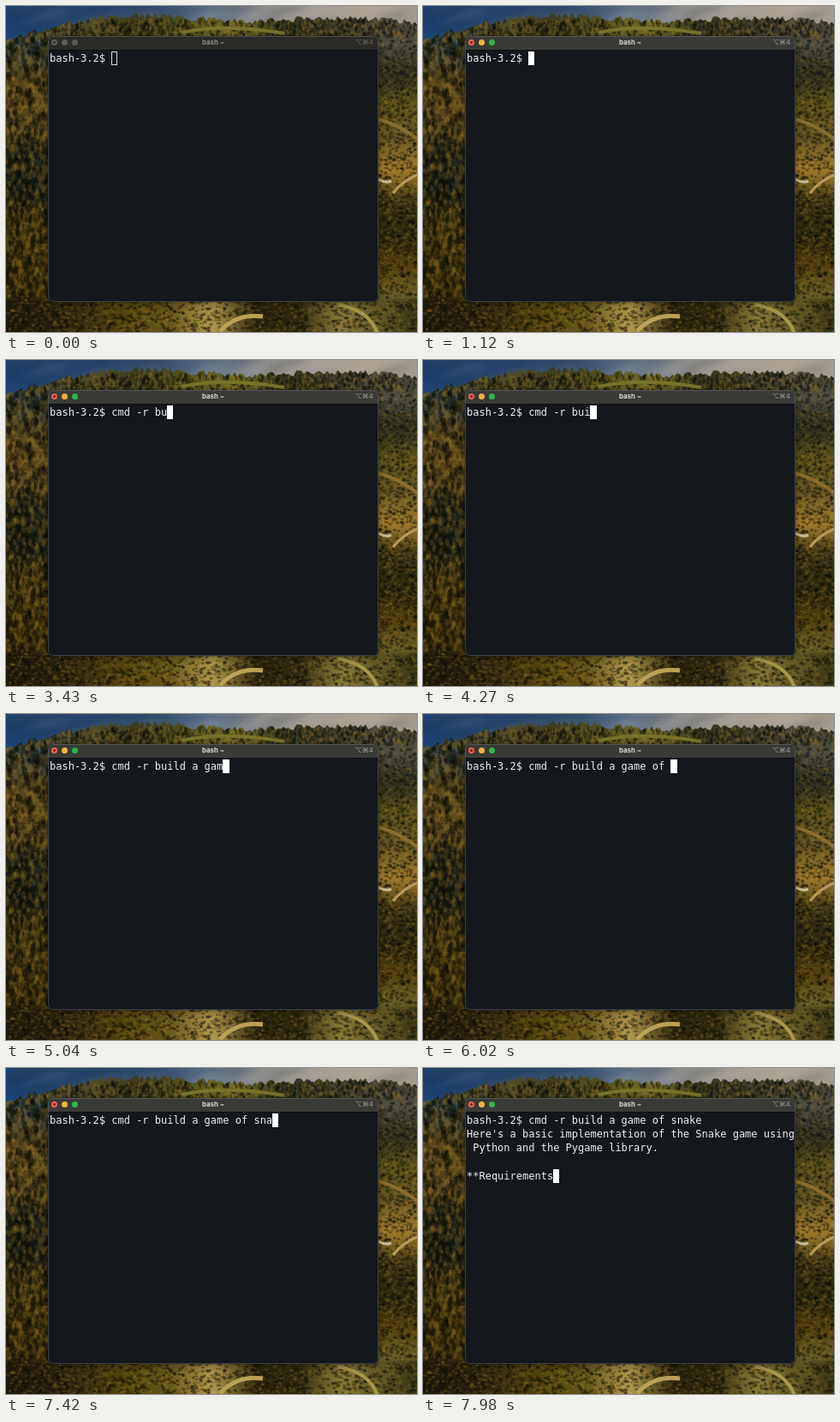
An HTML page with a canvas for the animation above (8 s loop, 480x380 px).

```html
<!DOCTYPE html>
<html lang="en">
<head>
<meta charset="utf-8">
<title>Terminal</title>
<style>
  html, body { margin: 0; width: 100%; height: 100%; overflow: hidden; background: #252812; }
  #stage { position: relative; width: 480px; height: 380px; overflow: hidden; }
  #land { position: absolute; left: 0; top: 0; }
  #win {
    position: absolute; left: 49px; top: 35px; width: 386px; height: 310px;
    border-radius: 6px; background: #14181c; overflow: hidden;
    box-shadow: 0 0 1px #000, 0 2px 8px rgba(0, 0, 0, .4);
  }
  #win::after {
    content: ""; position: absolute; inset: 0; border-radius: 6px;
    border: 1px solid rgba(120, 128, 132, .4);
  }
  #bar {
    position: absolute; left: 0; top: 0; width: 100%; height: 17px; box-sizing: border-box;
    background: #2b2a26; border-bottom: 1px solid #0c0f11; color: #8c8a86;
    font: 700 7.8px/15px Inter, "Liberation Sans", sans-serif; text-align: center;
  }
  #key {
    position: absolute; right: 6px; top: 0; color: #686763;
    font: 8px/15px Inter, "DejaVu Sans", sans-serif;
  }
  #dots { position: absolute; left: 4px; top: 4px; display: flex; gap: 5px; }
  #dots i { width: 7px; height: 7px; border-radius: 50%; background: #5c5b57; }
  #dots i:first-child { background: radial-gradient(circle, #33322f 1px, #5c5b57 1.6px); }
  .on #bar { background: #3a3a37; color: #dddbd7; }
  .on #key { color: #9b9995; }
  .on #dots i { background: #2bb845; }
  .on #dots i:nth-child(2) { background: #f3b13c; }
  .on #dots i:first-child { background: radial-gradient(circle, #74140f 1px, #ee5f55 1.6px); }
  #text, #cursor { position: absolute; font: 12px/16.2px "DejaVu Sans Mono", monospace; }
  #text { left: 2px; top: 18px; margin: 0; color: #eeefef; white-space: pre; }
  #cursor { width: 1ch; height: 16.2px; box-sizing: border-box; border: 1px solid #d8dadb; }
  .on #cursor { background: #fff; border-color: #fff; }
</style>
</head>
<body>
<div id="stage">
  <canvas id="land" width="480" height="380"></canvas>
  <div id="win">
    <div id="bar"><span id="dots"><i></i><i></i><i></i></span>bash ~<span id="key">⌥⌘4</span></div>
    <pre id="text"></pre>
    <div id="cursor"></div>
  </div>
</div>
<script>
const $ = id => document.getElementById(id);

// Landscape: soft colour bands around the window, roughened with random foliage
const ctx = $('land').getContext('2d');
let seed = 11;
const rnd = () => (seed = (seed * 16807) % 2147483647) / 2147483647;

function band(x, y, w, h, colors) {
  const g = w > h ? ctx.createLinearGradient(x, 0, x + w, 0) : ctx.createLinearGradient(0, y, 0, y + h);
  const list = colors.split(' ');
  list.forEach((c, i) => g.addColorStop(i / (list.length - 1), '#' + c));
  ctx.fillStyle = g;
  ctx.fillRect(x, y, w, h);
}

function foliage(x, y, w, h, size, tall) {
  const count = w * h / size / 2;
  for (let i = 0; i < count; i++) {
    const s = size * (.4 + rnd() * .6);
    ctx.fillStyle = rnd() < .6 ? 'rgba(10,13,6,.38)' : 'rgba(165,125,38,.22)';
    ctx.beginPath();
    ctx.ellipse(x + rnd() * w, y + rnd() * h, s / 2, s * tall / 2, 0, 0, 7);
    ctx.fill();
  }
}

function path(color, width, x, y, cx, cy, x2, y2) {
  ctx.strokeStyle = color;
  ctx.lineWidth = width;
  ctx.beginPath();
  ctx.moveTo(x, y);
  ctx.quadraticCurveTo(cx, cy, x2, y2);
  ctx.stroke();
}

const ridge = x => 17 + 22 * Math.exp(-x / 60) + 4 * Math.sin(x / 45 + 1.5) + 8 * Math.max(0, x - 330) / 150;

function paintLand() {
  ctx.filter = 'blur(2px)';
  band(-9, 0, 70, 380, '27496f 2f4149 51441c 665122 2b2d1a 18211a 443a12 4d3e0f 40340e 1e1a0c');
  band(420, 0, 70, 380, '9b9287 55534a 2b2d20 57501b 645425 a27b2b 3c3515 2b290e 56400f 66602a 2b2a0d');
  band(-9, 341, 500, 50, '1d190b 241e0c 3d3211 54440f 66551b b39a4d 30290e 2c280d 87793a 5b5423 2e2c10');
  band(-9, 8, 500, 32, '394133 3d4130 514b24 3d3c1e 545320 6b6826 363820 3d3d2a 4c493c 45443b');
  ctx.filter = 'none';

  foliage(0, 36, 50, 306, 6, 1.8);
  foliage(435, 40, 45, 300, 5, .8);
  foliage(0, 342, 480, 38, 5, .8);
  foliage(0, 16, 480, 20, 4, 1.6);

  // Sky and fog down to a tree-lined ridge
  ctx.save();
  ctx.filter = 'blur(1px)';
  ctx.beginPath();
  ctx.moveTo(490, -9);
  ctx.lineTo(-9, -9);
  for (let x = -9; x < 490; x += 3) ctx.lineTo(x, ridge(x) - rnd() * 7);
  ctx.clip();
  band(-9, -9, 500, 60, '1c4578 25466f 27456c 344d6c 5c6e84 918f8b a49c92 aea497 a0978b');
  ctx.filter = 'blur(4px)';
  for (let i = 0; i < 45; i++) {
    ctx.fillStyle = rnd() < .5 ? 'rgba(12,28,48,.2)' : 'rgba(190,188,184,.12)';
    ctx.beginPath();
    ctx.ellipse(rnd() * 480, rnd() * 36, 28, 4, -.25, 0, 7);
    ctx.fill();
  }
  ctx.restore();

  // Clearings and tracks
  ctx.filter = 'blur(.7px)';
  path('#77732b', 4, 205, 31, 255, 20, 325, 32);
  path('#8a6c2f', 4, 435, 132, 458, 138, 482, 156);
  path('#b9985a', 3, 452, 218, 464, 203, 482, 196);
  path('#c5ba9b', 3, 435, 202, 443, 207, 450, 204);
  path('#bba158', 5, 250, 379, 270, 358, 300, 362);
  path('#a8964c', 4, 388, 348, 425, 355, 434, 382);
  ctx.filter = 'none';
}

// Terminal
const LOOP = 8000, FOCUS = 560, ENTER = 7770, REPLY = 7910, MORE = 7980;
const prompt = 'bash-3.2$ ';
const reply = "\nHere's a basic implementation of the Snake game using\n Python and the Pygame library.";
const more = '\n\n**Requirements';

// Typing bursts: text, time of its first key, time between keys
const bursts = [
  ['cmd -r ', 1400, 80], ['bui', 3080, 315], ['ld a g', 4340, 98], ['ame', 4900, 140],
  [' of ', 5460, 140], ['sna', 6860, 210], ['ke', 7560, 70]
];

function screenAt(t) {
  let s = prompt;
  for (const [text, at, pace] of bursts) {
    s += text.slice(0, Math.max(0, Math.floor((t - at) / pace) + 1));
  }
  if (t >= REPLY) s += reply;
  else if (t >= ENTER) s += '\n';
  if (t >= MORE) s += more;
  return s;
}

let shown;
function draw(t) {
  $('stage').classList.toggle('on', t >= FOCUS);
  const s = screenAt(t);
  if (s === shown) return;
  shown = s;
  $('text').textContent = s;
  const rows = s.split('\n');
  $('cursor').style.left = `calc(2px + ${rows[rows.length - 1].length}ch)`;
  $('cursor').style.top = 18 + (rows.length - 1) * 16.2 + 'px';
}

paintLand();
const start = performance.now();
function tick() {
  draw((performance.now() - start) % LOOP);
  requestAnimationFrame(tick);
}
tick();
</script>
</body>
</html>
```
